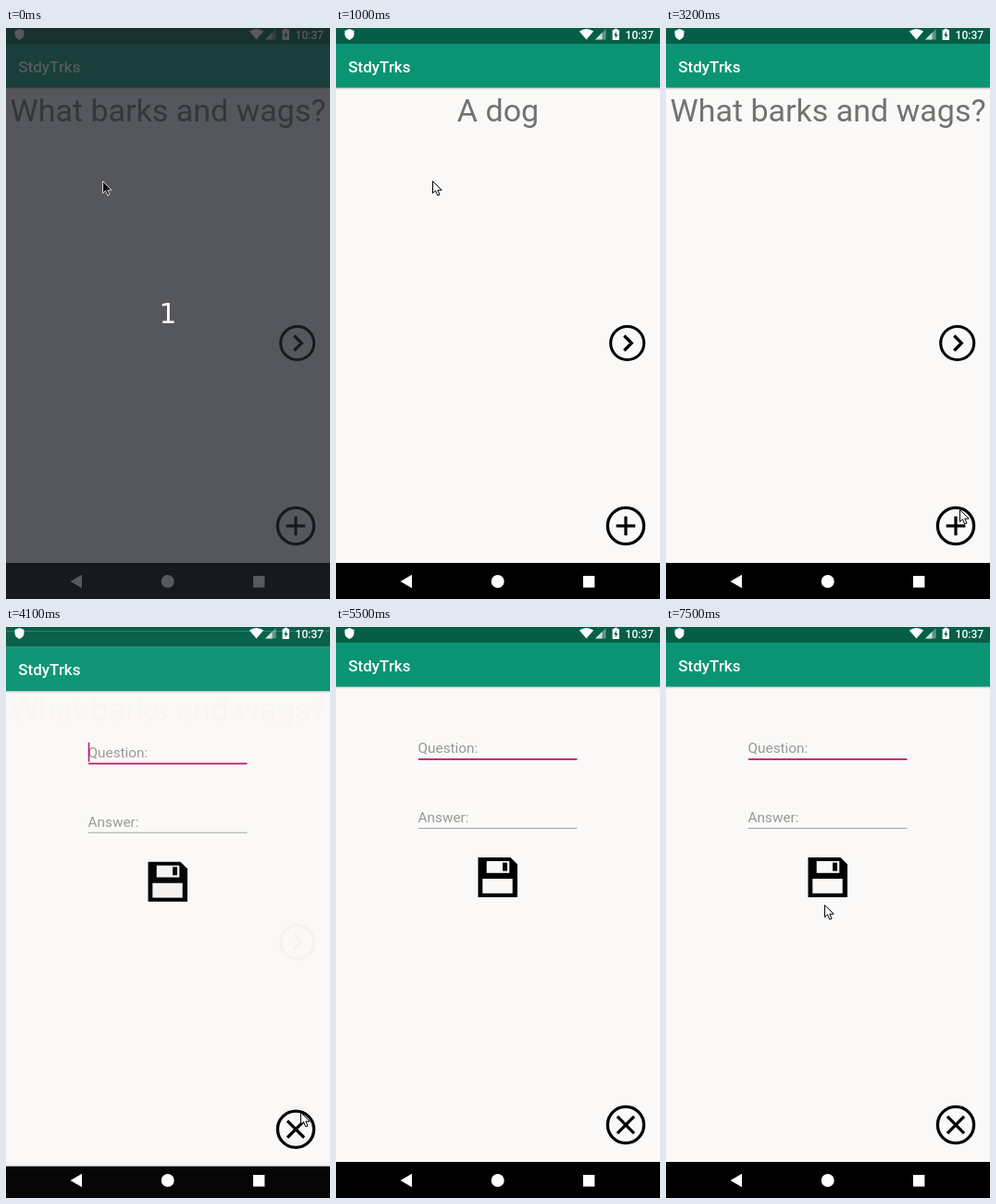
These frames come from a looping animation (350x617 px, 8000 ms). An HTML page with a canvas:

```html
<!DOCTYPE html>
<html lang="en">
<head>
<meta charset="utf-8">
<title>Card app</title>
<style>
  html, body { margin: 0; width: 100%; height: 100%; overflow: hidden; background: #faf9f7; }
  canvas { display: block; }
</style>
</head>
<body>
<canvas id="stage" width="350" height="617"></canvas>
<script>
const W = 350, H = 617, LOOP = 8000, STEP = 100;
const ctx = document.getElementById('stage').getContext('2d');
const PAPER = '#faf9f7', BAR = '#0b9474', STATUS = '#065e48';

function rect(color, x, y, w, h) {
  ctx.fillStyle = color;
  ctx.fillRect(x, y, w, h);
}

function trace(points, closed) {
  ctx.beginPath();
  points.forEach(([x, y], i) => i ? ctx.lineTo(x, y) : ctx.moveTo(x, y));
  if (closed) ctx.closePath();
}

function poly(color, points) {
  trace(points, true);
  ctx.fillStyle = color;
  ctx.fill();
}

function line(width, points) {
  trace(points);
  ctx.strokeStyle = '#000';
  ctx.lineWidth = width;
  ctx.stroke();
}

function text(str, x, y, size, color, weight = 400, align = 'left', family = 'Roboto') {
  ctx.font = `${weight} ${size}px ${family}, sans-serif`;
  ctx.textAlign = align;
  ctx.fillStyle = color;
  ctx.fillText(str, x, y);
}

function ring(x, y, r, width) {
  ctx.beginPath();
  ctx.arc(x, y, r, 0, Math.PI * 2);
  ctx.strokeStyle = '#000';
  ctx.lineWidth = width;
  ctx.stroke();
}

function appWindow() {
  rect(PAPER, 0, 0, W, H);
  rect('rgba(0,0,0,.24)', 0, 64, W, 1);
  rect('rgba(0,0,0,.11)', 0, 65, W, 1);
  rect('rgba(0,0,0,.04)', 0, 66, W, 1);
  rect(STATUS, 0, 0, W, 17);
  rect(BAR, 0, 17, W, 47.4);
  text('StdyTrks', 13.3, 47.6, 17, '#fff', 500);
  rect('#000', 0, 578, W, 40);
}

// The round button: a plus, or a cross when turned by 45 degrees.
function roundButton(angle) {
  ring(313, 538, 19.6, 3.3);
  ctx.save();
  ctx.translate(313, 538);
  ctx.rotate(angle);
  const arm = angle ? 12.8 : 10.3;
  line(3.2, [[-arm, 0], [arm, 0]]);
  line(3.2, [[0, -arm], [0, arm]]);
  ctx.restore();
}

function cardScreen(label) {
  appWindow();
  text(label, W / 2, 101.4, 34.03, '#737271', 400, 'center');
  ring(314.7, 340.5, 18, 3.1);
  line(3.2, [[311.3, 332.5], [319.3, 340.5], [311.3, 348.5]]);
  roundButton(0);
}

function disk() {
  poly('#000', [[153.5, 249], [188.5, 249], [196, 256.5], [196, 292], [153.5, 292]]);
  rect(PAPER, 162.7, 253, 24.6, 12.8);
  rect('#000', 180, 254.6, 5, 9);
  rect(PAPER, 158.3, 272, 32.4, 15.8);
}

function formScreen(caret) {
  appWindow();
  text('Question:', 88.6, 136.3, 15.3, '#999896');
  text('Answer:', 88.6, 211.2, 15.3, '#999896');
  rect('#c0186a', 89, 142, 171.5, 1.8);
  rect('#a3a2a0', 89, 217, 171.5, 1);
  if (caret) rect('#c0186a', 88.7, 120, 1.6, 21);
  disk();
  roundButton(Math.PI / 4);
}

function wifi() {
  ctx.beginPath();
  ctx.moveTo(270.5, 12.6);
  ctx.lineTo(262.8, 3.6);
  ctx.quadraticCurveTo(270.5, -1.6, 278.2, 3.6);
  ctx.closePath();
  ctx.fillStyle = '#fff';
  ctx.fill();
}

function shield() {
  ctx.beginPath();
  ctx.moveTo(14.5, 1);
  ctx.lineTo(19.5, 3);
  ctx.lineTo(19.5, 6.5);
  ctx.quadraticCurveTo(19.3, 11, 14.5, 13);
  ctx.quadraticCurveTo(9.7, 11, 9.5, 6.5);
  ctx.lineTo(9.5, 3);
  ctx.closePath();
  ctx.fillStyle = '#fff';
  ctx.fill();
}

function systemIcons() {
  shield();
  wifi();
  poly('rgba(255,255,255,.35)', [[280, 12.6], [291.6, 12.6], [291.6, 1]]);
  poly('rgba(255,255,255,.7)', [[280, 12.6], [287.5, 12.6], [287.5, 5.1]]);
  rect('#fff', 300.6, 0.8, 3.4, 2);
  rect('#fff', 298.6, 2, 7.4, 11);
  poly(STATUS, [[303, 3.6], [300.2, 8.2], [302, 8.2], [301.6, 11.6], [304.5, 6.9], [302.7, 6.9]]);
  text('10:37', 312.6, 11.5, 12, '#fff', 500);

  poly('#fff', [[69.5, 598], [82, 590.8], [82, 605.2]]);
  ctx.beginPath();
  ctx.arc(174.7, 598, 7, 0, Math.PI * 2);
  ctx.fill();
  rect('#fff', 267, 592, 12.4, 12.6);
}

function pointer([x, y], fill, edge) {
  ctx.save();
  ctx.translate(x + 0.5, y + 0.5);
  poly(fill, [[0, 0], [0, 13], [3, 10.3], [5.3, 15.5], [7.5, 14.5], [5.3, 9.7], [9.6, 9.7]]);
  ctx.strokeStyle = edge;
  ctx.lineWidth = 1;
  ctx.stroke();
  ctx.restore();
}

const easeInOut = p => p * p * (3 - 2 * p);
const easeOut = p => 1 - (1 - p) ** 3;
const mix = (a, b, p) => a.map((v, i) => v + (b[i] - v) * p);

function pointerAt(t) {
  if (t < 2700) return [104, 165];
  if (t < 3200) return mix([104, 165], [317, 520], easeInOut((t - 2600) / 600));
  if (t < 3400) return [317, 520];
  if (t < 4500) return [318, 524];
  if (t < 4700) return mix([318, 524], [316, 605], (t - 4400) / 200);
  if (t < 6300) return null;
  if (t < 6600) return mix([199, 518], [172, 322], easeOut((t - 6300) / 300));
  if (t < 6800) return [172, 322];
  return [171, 300];
}

// The caret flips at each of these times, starting visible.
const blinks = [4500, 5000, 5500, 6100, 6500, 7000, 7500];
const caretOn = t => blinks.filter(b => b <= t).length % 2 === 0;

function draw(t) {
  const opening = 4100;
  if (t < opening + 200) cardScreen(t >= 900 && t < 2000 ? 'A dog' : 'What barks and wags?');
  if (t >= opening) {
    const left = Math.max(0, 1 - (t - opening) / 200) ** 2;
    ctx.save();
    ctx.globalAlpha = 1 - 0.025 * left;
    ctx.translate(0, 4.7 * left);
    formScreen(caretOn(t));
    ctx.restore();
  }
  systemIcons();

  const intro = t < 100;
  if (intro) {
    rect('rgba(30,34,41,.75)', 0, 0, W, H);
    text('1', 175, 318.5, 29.5, '#fff', 400, 'center', '"DejaVu Sans"');
  }
  const tip = pointerAt(t);
  if (tip) pointer(tip, intro ? '#0c0d10' : '#fff', intro ? '#d8d8d8' : '#000');
}

function tick() {
  const t = performance.now() % LOOP;
  draw(Math.floor(t / STEP) * STEP);
  requestAnimationFrame(tick);
}
tick();
</script>
</body>
</html>
```
